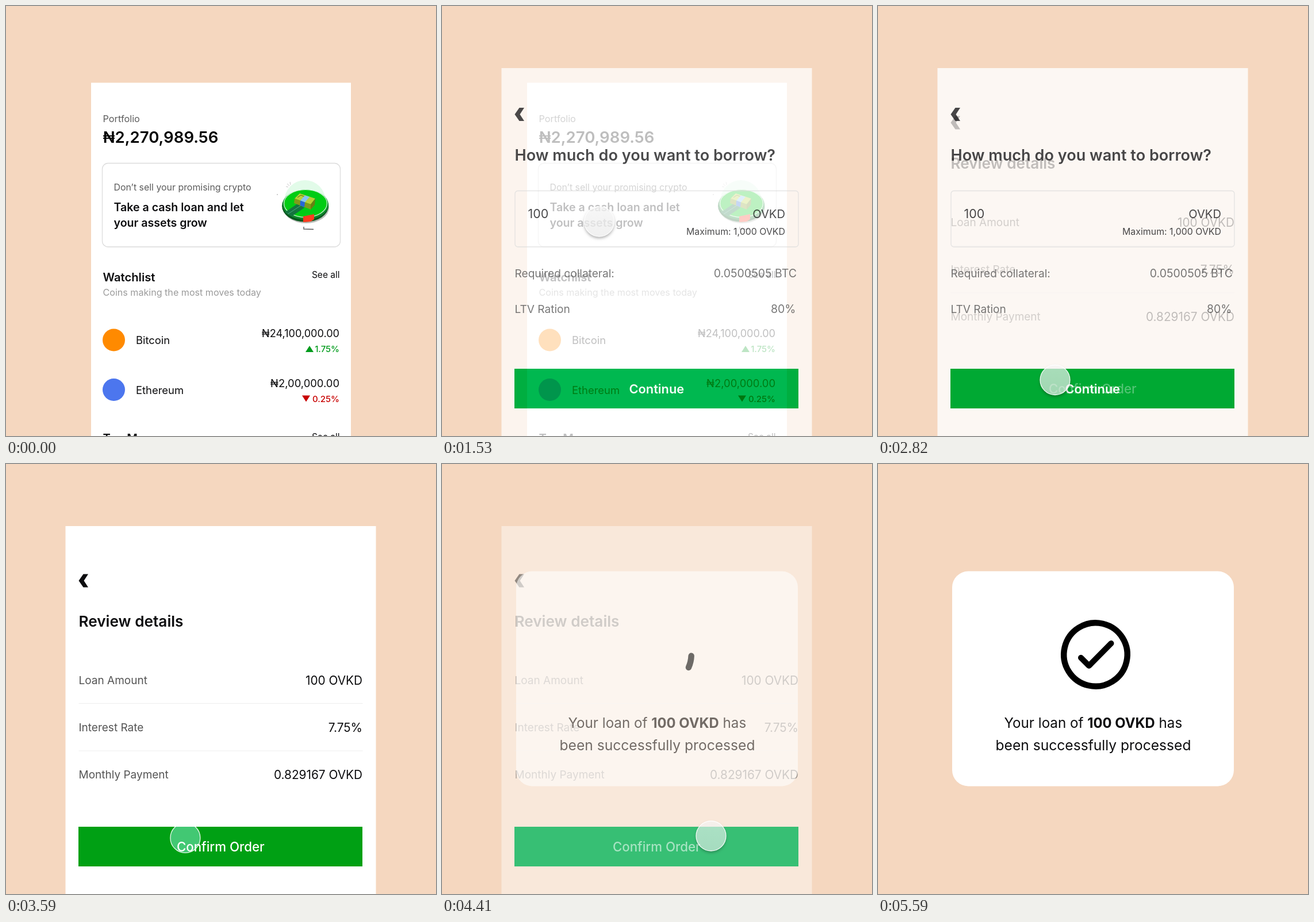
Recreate the animation shown at these times as an HTML page with a canvas. Size 748 by 748 pixels, loop 7.29 s.

```html
<!DOCTYPE html>
<html lang="en">
<head>
<meta charset="utf-8">
<title>Loan flow</title>
<style>
  html, body { margin: 0; width: 100%; height: 100%; overflow: hidden; background: #f5d7bf; }
  canvas { display: block; width: 748px; height: 748px; }
</style>
</head>
<body>
<canvas id="stage" width="748" height="748"></canvas>
<script>
const SIZE = 748, LOOP = 7290, FPS = 17;
const GREEN = '#00a014', INK = '#0d0d0f', TICKER = 'OVKD';
const BUTTON = [126, 631, 494, 69];
const stage = document.getElementById('stage').getContext('2d');

const clamp = x => Math.min(1, Math.max(0, x));
const mix = (a, b, u) => a + (b - a) * u;
const span = (t, start, length) => clamp((t - start) / length);
const easeOut = x => Math.sin(x * Math.PI / 2);
const easeInOut = x => (1 - Math.cos(x * Math.PI)) / 2;
const easeBack = x => 1 + 2.2 * (x - 1) ** 3 + 1.2 * (x - 1) ** 2;

function text(c, str, x, y, size, weight = 400, color = INK, align = 'left') {
  c.font = `${weight} ${size}px Inter, sans-serif`;
  c.fillStyle = color;
  c.textAlign = align;
  c.fillText(str, x, y);
  return c.measureText(str).width;
}

function polygon(c, color, ...points) {
  c.beginPath();
  points.forEach(([x, y]) => c.lineTo(x, y));
  c.closePath();
  c.fillStyle = color;
  c.fill();
}

function ellipse(c, color, x, y, rx, ry = rx, from = 0, to = Math.PI * 2) {
  c.beginPath();
  c.ellipse(x, y, rx, ry, 0, from, to);
  c.fillStyle = color;
  c.fill();
}

function line(c, color, width, ...points) {
  c.beginPath();
  points.forEach(([x, y]) => c.lineTo(x, y));
  c.strokeStyle = color;
  c.lineWidth = width;
  c.stroke();
}

function outline(c, x, y, w, h, r) {
  c.beginPath();
  c.roundRect(x, y, w, h, r);
  c.strokeStyle = '#dcdcdc';
  c.lineWidth = 1.3;
  c.stroke();
}

function rect(c, color, x, y, w, h) {
  c.fillStyle = color;
  c.fillRect(x, y, w, h);
}

function layer(draw) {
  const canvas = document.createElement('canvas');
  canvas.width = canvas.height = SIZE;
  draw(canvas.getContext('2d'));
  return canvas;
}

function illustration(c) {
  ellipse(c, '#e2fbe9', 520, 340, 36, 37, Math.PI, 0);
  ellipse(c, '#b9beb9', 522, 351, 40, 27);
  ellipse(c, '#07581d', 520.5, 348, 40.5, 27.5);
  ellipse(c, '#0c8a2b', 521, 345.5, 40, 26);
  ellipse(c, '#00cc14', 521, 343.5, 37.5, 24);
  c.strokeStyle = '#d8f8dc';
  c.lineWidth = 1.2;
  c.stroke();
  polygon(c, '#14743f', [485, 359], [507, 344], [519, 351], [497, 366]);
  line(c, '#4fa582', 1, [490, 362], [513, 347]);
  // stack of notes
  polygon(c, '#b8cf35', [502, 335], [511, 326], [538, 335], [530, 345]);
  polygon(c, '#809a1b', [502, 335], [530, 345], [530, 354], [501, 343]);
  polygon(c, '#687f14', [530, 345], [538, 335], [537, 346], [530, 354]);
  line(c, '#4c6510', 1, [507, 333], [513, 329], [520, 332]);
  polygon(c, '#84c4f2', [512, 338.5], [520, 329.5], [528, 332], [520, 341.5]);
  polygon(c, '#2666d6', [512, 338.5], [520, 341.5], [519, 350], [511.5, 347]);
  // front tab and stand
  polygon(c, '#ff3b20', [517, 366], [536, 362], [536, 371], [530, 375], [517, 376]);
  line(c, '#555', 1.4, [518, 384], [518, 388], [535, 388.5]);
  line(c, '#c9c9c9', 1, [489, 309], [493, 313]);
  line(c, '#c9c9c9', 1, [494, 306], [495, 311]);
  line(c, '#c9c9c9', 1, [487, 314], [491, 315]);
  ellipse(c, '#bbb', 472, 328, 1);
}

function coin(c, y, color, name, price, size, change, up) {
  const tone = up ? '#009b1c' : '#c80000', dir = up ? -1 : 1, x = up ? 528 : 522;
  ellipse(c, color, 187.5, y, 19.5);
  text(c, name, 226, y + 7, 18.4);
  text(c, price, 580, y - 5, size, 400, INK, 'right');
  text(c, change, 580, y + 21, 15, 500, tone, 'right');
  const mid = y + 15.5;
  polygon(c, tone, [x, mid + 5.5 * dir], [x - 7, mid - 5.5 * dir], [x + 7, mid - 5.5 * dir]);
}

const home = layer(c => {
  rect(c, '#fff', 148, 133.5, 452, 615);
  text(c, 'Portfolio', 168.5, 202, 16.3, 400, '#5c5c5c');
  text(c, '₦2,270,989.56', 168.5, 238, 27.6, 600, '#050505');
  outline(c, 167.5, 273.5, 414, 145.5, 10);
  text(c, 'Don’t sell your promising crypto', 187.5, 321, 15.9, 400, '#5c5c5c');
  text(c, 'Take a cash loan and let', 187.5, 357, 19.6, 600);
  text(c, 'your assets grow', 187.5, 383.5, 19.6, 600);
  illustration(c);
  text(c, 'Watchlist', 168.5, 478.5, 20.2, 600);
  text(c, 'See all', 580.5, 472.5, 15.5, 400, INK, 'right');
  text(c, 'Coins making the most moves today', 168.5, 504, 16.1, 400, '#9b9b9b');
  coin(c, 581, '#ff8a00', 'Bitcoin', '₦24,100,000.00', 18.1, '1.75%', true);
  coin(c, 667.5, '#4c76ee', 'Ethereum', '₦2,00,000.00', 18.4, '0.25%', false);
  text(c, 'Top Movers', 168.5, 759, 20.2, 600);
  text(c, 'See all', 580.5, 754.5, 15.5, 400, INK, 'right');
});

const panel = layer(c => {
  rect(c, '#fff', 103.5, 108, 540, 640);
  rect(c, GREEN, ...BUTTON);
});

function header(c, y, title, size) {
  polygon(c, INK, [134.5, y - 11.5], [143, y - 11.5], [135.5, y],
    [143, y + 11.5], [134.5, y + 11.5], [126.5, y]);
  text(c, title, 126.5, y + 80, size, 600);
}

const borrow = layer(c => {
  header(c, 188.5, 'How much do you want to borrow?', 27.1);
  outline(c, 127, 321.5, 493, 97.5, 5);
  text(c, '100', 149.5, 369, 21.5);
  text(c, TICKER, 597, 369, 20.2, 400, INK, 'right');
  text(c, 'Maximum: 1,000 ' + TICKER, 597, 398, 15.9, 400, INK, 'right');
  const row = (y, label, value, right) => {
    text(c, label, 126.5, y, 19.1, 400, '#4a4a4a');
    text(c, value, right, y, 19.5, 400, '#4a4a4a', 'right');
  };
  row(471.5, 'Required collateral:', '0.0500505 BTC', 617);
  row(534, 'LTV Ration', '80%', 615.5);
});

const review = layer(c => {
  header(c, 203, 'Review details', 26.2);
  const row = (y, label, value) => {
    text(c, label, 126.5, y - 1, 19, 400, '#555');
    text(c, value, 620, y, 20.8, 400, INK, 'right');
  };
  row(384, 'Loan Amount', '100 ' + TICKER);
  row(466, 'Interest Rate', '7.75%');
  row(548, 'Monthly Payment', '0.829167 ' + TICKER);
  for (const y of [416, 498.5]) rect(c, '#ededed', 126.5, y, 494, 1);
});

const done = layer(c => {
  c.beginPath();
  c.roundRect(129, 186.5, 490, 374, 28);
  c.fillStyle = '#fff';
  c.fill();
  let x = 219.5;
  x += text(c, 'Your loan of ', x, 459, 24.2);
  x += text(c, '100 ' + TICKER, x, 459, 23.8, 700);
  text(c, ' has', x, 459, 24.2);
  text(c, 'been successfully processed', 374.5, 498, 24.6, 400, INK, 'center');
});

function show(page, alpha) {
  stage.globalAlpha = alpha;
  stage.drawImage(page, 0, 0);
  stage.globalAlpha = 1;
}

// Keeps the button a saturated green while pages blend.
function deepenButton(alpha) {
  stage.globalCompositeOperation = 'multiply';
  stage.globalAlpha = clamp(alpha);
  rect(stage, '#0ff', ...BUTTON);
  stage.globalCompositeOperation = 'source-over';
  stage.globalAlpha = 1;
}

function buttonLabel(str, size, weight, alpha) {
  stage.globalAlpha = clamp(1.3 * alpha);
  text(stage, str, 373.3, 673.5, size, weight, '#fff', 'center');
  stage.globalAlpha = 1;
}

function spinner(t, alpha) {
  const grow = span(t, 4580, 470), check = span(t, 5060, 230);
  stage.globalAlpha = alpha;
  stage.lineCap = stage.lineJoin = 'round';
  stage.strokeStyle = '#000';
  stage.lineWidth = 10.5;
  const sweep = Math.PI * 2 * mix(0.06, 1, grow);
  const middle = 1.8 + Math.PI * (grow - 0.5);
  stage.beginPath();
  stage.arc(378.5, 331.5, 55.2, middle - sweep / 2, middle + sweep / 2);
  stage.stroke();
  if (check > 0) {
    const dx = -16 * (1 - easeOut(check));
    stage.globalAlpha = easeOut(check);
    line(stage, '#000', 10, [353 + dx, 337], [367 + dx, 351], [405.5 + dx, 312]);
  }
  stage.globalAlpha = 1;
}

function cursorAt(t) {
  if (t < 529 || t >= 5580) return null;
  if (t < 2000) {
    const u = span(t, 529, 345), e = easeBack(u);
    return { x: mix(505, 273.5, e), y: mix(594, 375, e), alpha: mix(0.3, 1, clamp(u * 2)) };
  }
  if (t < 3500) {
    const u = easeInOut(span(t, 2000, 640));
    return { x: mix(273.5, 308, u) + 20 * Math.sin(Math.PI * u), y: mix(375, 650.5, u), alpha: 1 };
  }
  if (t < 5400) {
    const u = easeInOut(span(t, 3530, 585));
    return { x: mix(308, 468, u), y: mix(650.5, 647, u), alpha: 1 };
  }
  const u = span(t, 5410, 180);
  return { x: mix(468, 392, u), y: mix(647, 735, u), alpha: 1 - u };
}

function cursor(t, solid) {
  const at = cursorAt(t);
  if (!at) return;
  const { x, y, alpha } = at, r = 26;
  const disc = color => ellipse(stage, color, x, y, r);

  // shadow only outside the disc, which is translucent
  stage.save();
  stage.beginPath();
  stage.rect(0, 0, SIZE, SIZE);
  stage.arc(x, y, r, 0, Math.PI * 2);
  stage.clip('evenodd');
  stage.globalAlpha = alpha * solid;
  stage.shadowColor = 'rgba(0,0,0,.32)';
  stage.shadowBlur = 5;
  stage.shadowOffsetY = 3;
  disc('#fff');
  stage.restore();

  const fill = stage.createLinearGradient(0, y - r, 0, y + r);
  fill.addColorStop(0, '#f4f4f4');
  fill.addColorStop(1, '#eaeaea');
  stage.globalAlpha = alpha * solid * 0.73;
  disc(fill);
  stage.globalAlpha = alpha * (1 - solid);
  stage.globalCompositeOperation = 'screen';
  disc('rgb(66,107,103)');
  stage.globalCompositeOperation = 'source-over';
  stage.globalAlpha = alpha;
  stage.beginPath();
  stage.arc(x, y, r, 0, Math.PI * 2);
  stage.strokeStyle = 'rgba(255,255,255,.9)';
  stage.lineWidth = 1.3;
  stage.stroke();
  stage.globalAlpha = 1;
}

function render(ms) {
  const t = Math.floor((ms + 4) * FPS / 1000) * 1000 / FPS;
  const toBorrow = easeOut(span(t, 1370, 300));
  const toReview = easeOut(span(t, 2776, 300));
  const toDone = easeOut(span(t, 4296, 300));
  const borrowing = toBorrow * (1 - toReview);
  const reviewing = toReview * (1 - toDone);

  rect(stage, '#f5d7bf', 0, 0, SIZE, SIZE);
  if (toBorrow < 1) show(home, 1);
  show(panel, borrowing);
  show(panel, reviewing);
  show(borrow, borrowing);
  show(review, reviewing);
  deepenButton(1.4 * toBorrow * (1 - toDone));
  buttonLabel('Confirm Order', 22.3, 500, reviewing);
  buttonLabel('Continue', 21.8, 600, borrowing);
  if (toDone > 0) {
    show(done, toDone);
    spinner(t, toDone);
  }
  cursor(t, 1 - reviewing ** 2);
}

const began = performance.now();
function tick() {
  render((performance.now() - began) % LOOP);
  requestAnimationFrame(tick);
}
tick();
</script>
</body>
</html>
```
